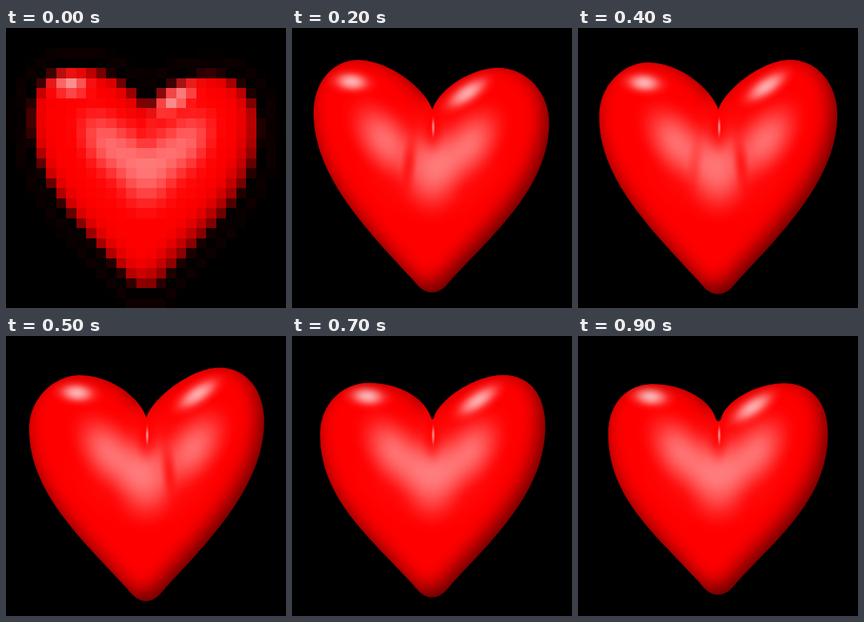
These frames come from a looping animation (350 by 350 pixels, 1 s). An HTML page with a canvas:

```html
<!DOCTYPE html>
<html lang="en">
<head>
<meta charset="utf-8">
<title>Beating heart</title>
<style>
  html, body { margin: 0; width: 100%; height: 100%; overflow: hidden; background: #000; }
  canvas { display: block; width: 350px; height: 350px; }
</style>
</head>
<body>
<canvas id="stage" width="350" height="350"></canvas>
<script>
const SIZE = 350, STEP = 100, STEPS = 10, CELLS = 28;
const RED = '255,0,0', WHITE = '255,255,255';
const ctx = document.getElementById('stage').getContext('2d');

const clamp = (v, lo, hi) => Math.min(hi, Math.max(lo, v));

// One smooth swell around its peak, zero half a loop away
const swell = (step, peak) =>
  Math.abs(step - peak) < STEPS / 2 ? Math.cos(Math.PI * (step - peak) / STEPS) ** 2 : 0;

// The left lobe swells first, the right one follows
function poseAt(step) {
  const l = swell(step, 2.4), r = swell(step, 4.7);
  const gap = s => clamp(3.5 * (s - .67), 0, .8);
  return {
    left: { x: 38 - 9 * l - 5 * r, y: 122 - 17 * l + 2 * r },
    leftTop: { x: 93 - 13 * l + 5 * r, y: 60 - 19.5 * l - 2 * r },
    right: { x: 312 + 6 * l + 8 * r, y: 122 - 17 * r + 3 * l },
    rightTop: { x: 257 + 12 * r - 4.5 * l, y: 60 - 20 * r - 1.5 * l },
    notch: 107 - 5 * Math.min(1, l + r),
    tip: 323 + 5 * l + 6 * r,
    gapL: gap(l),
    gapR: gap(r)
  };
}

function heartPath({ left, leftTop, right, rightTop, notch, tip }) {
  const path = new Path2D(), round = (notch - 102) * .7;
  path.moveTo(175, tip);
  path.bezierCurveTo(165, tip, 159, tip - 6, 151, tip - 16);
  path.bezierCurveTo(97, tip - 75, left.x, left.y + 80, left.x, left.y);
  path.bezierCurveTo(left.x, left.y - 38, leftTop.x - 32, leftTop.y, leftTop.x, leftTop.y);
  path.bezierCurveTo(leftTop.x + 39, leftTop.y, 167, notch - 26, 175.5 - round, notch - round);
  path.quadraticCurveTo(175.5, notch + round, 175.5 + round, notch - round);
  path.bezierCurveTo(184, notch - 26, rightTop.x - 34, rightTop.y, rightTop.x, rightTop.y);
  path.bezierCurveTo(rightTop.x + 36, rightTop.y, right.x, right.y - 36, right.x, right.y);
  path.bezierCurveTo(right.x, right.y + 80, 254, tip - 75, 199, tip - 16);
  path.bezierCurveTo(191, tip - 6, 185, tip, 175, tip);
  path.closePath();
  return path;
}

// Soft elliptical spot
function glow(c, x, y, rx, ry, deg, alpha, rgb = WHITE) {
  if (alpha <= 0) return;
  c.save();
  c.translate(x, y);
  c.rotate(deg * Math.PI / 180);
  c.scale(rx, ry);
  const g = c.createRadialGradient(0, 0, 0, 0, 0, 1);
  for (let i = 0; i <= 8; i++) {
    const fall = (1 + Math.cos(Math.PI * i / 8)) / 2;
    g.addColorStop(i / 8, `rgba(${rgb},${(alpha * fall).toFixed(3)})`);
  }
  c.fillStyle = g;
  c.fillRect(-1, -1, 2, 2);
  c.restore();
}

function drawSheen(c, { gapL, gapR }) {
  glow(c, 175, 163, 108, 88, 0, .1);
  for (const [side, gap] of [[-1, gapL], [1, gapR]]) {
    glow(c, 175 + side * (46 + 17 * gap), 146 - 8 * gap, 72, 43, side * -52, .41);
  }
  glow(c, 175, 176, 50, 70, 0, .4);
  for (const [side, gap] of [[-1, gapL], [1, gapR]]) {
    glow(c, 175 + side * 29, 170, 13, 50, side * -6, gap * .85, RED);
  }
}

// Darkens the rim, deeper at the lower right
function shadeRim(c, heart) {
  const outside = new Path2D();
  outside.rect(-60, -60, SIZE + 120, SIZE + 120);
  outside.addPath(heart);
  c.shadowColor = 'rgba(0,0,0,.62)';
  c.shadowBlur = 25;
  c.shadowOffsetX = -6;
  c.shadowOffsetY = -9;
  c.fillStyle = '#000';
  c.fill(outside, 'evenodd');
}

function drawHeart(c, pose) {
  const heart = heartPath(pose), { leftTop, rightTop } = pose;
  c.fillStyle = '#f00';
  c.fill(heart);
  c.save();
  c.clip(heart);
  drawSheen(c, pose);

  // Crease and its glint
  glow(c, 175.5, 120, 19, 44, 0, .9, RED);
  glow(c, 176.5, 124, 2.6, 16, 0, .55);

  // Highlights ride on the lobes
  const lx = leftTop.x * 1.5 - 49, ly = leftTop.y * .43 + 50;
  const rx = 217 + (rightTop.x - 257) * 2.3, ry = 40 + rightTop.y * .83;
  glow(c, lx, ly, 38, 20, 5, .35);
  glow(c, lx, ly, 25, 14, 5, .52);
  glow(c, rx, ry, 47, 20, -34, .42);
  glow(c, rx, ry, 34, 13, -34, .42);

  shadeRim(c, heart);
  c.restore();
}

function clear(c) {
  c.fillStyle = '#000';
  c.fillRect(0, 0, SIZE, SIZE);
}

function makeLayer(size) {
  const el = document.createElement('canvas');
  el.width = el.height = size;
  return el;
}

// Faint ring around the coarse heart
function drawHalo(c, heart) {
  c.lineJoin = 'round';
  for (const [color, width] of [['#120000', 50], ['#000', 30]]) {
    c.strokeStyle = color;
    c.lineWidth = width;
    c.stroke(heart);
  }
}

// Coarse version: shrink by halves, then enlarge in hard blocks
function drawBlocks(pose) {
  let layer = makeLayer(SIZE);
  const c = layer.getContext('2d');
  clear(c);
  drawHalo(c, heartPath(pose));
  drawHeart(c, pose);
  for (let size = CELLS * 8; size >= CELLS; size /= 2) {
    const next = makeLayer(size);
    next.getContext('2d').drawImage(layer, 0, 0, size, size);
    layer = next;
  }
  ctx.imageSmoothingEnabled = false;
  ctx.drawImage(layer, 0, 0, SIZE, SIZE);
}

let shown = -1;
function tick() {
  const step = Math.floor(performance.now() / STEP) % STEPS;
  if (step !== shown) {
    shown = step;
    clear(ctx);
    (step === 0 ? drawBlocks : p => drawHeart(ctx, p))(poseAt(step));
  }
  requestAnimationFrame(tick);
}
tick();
</script>
</body>
</html>
```
